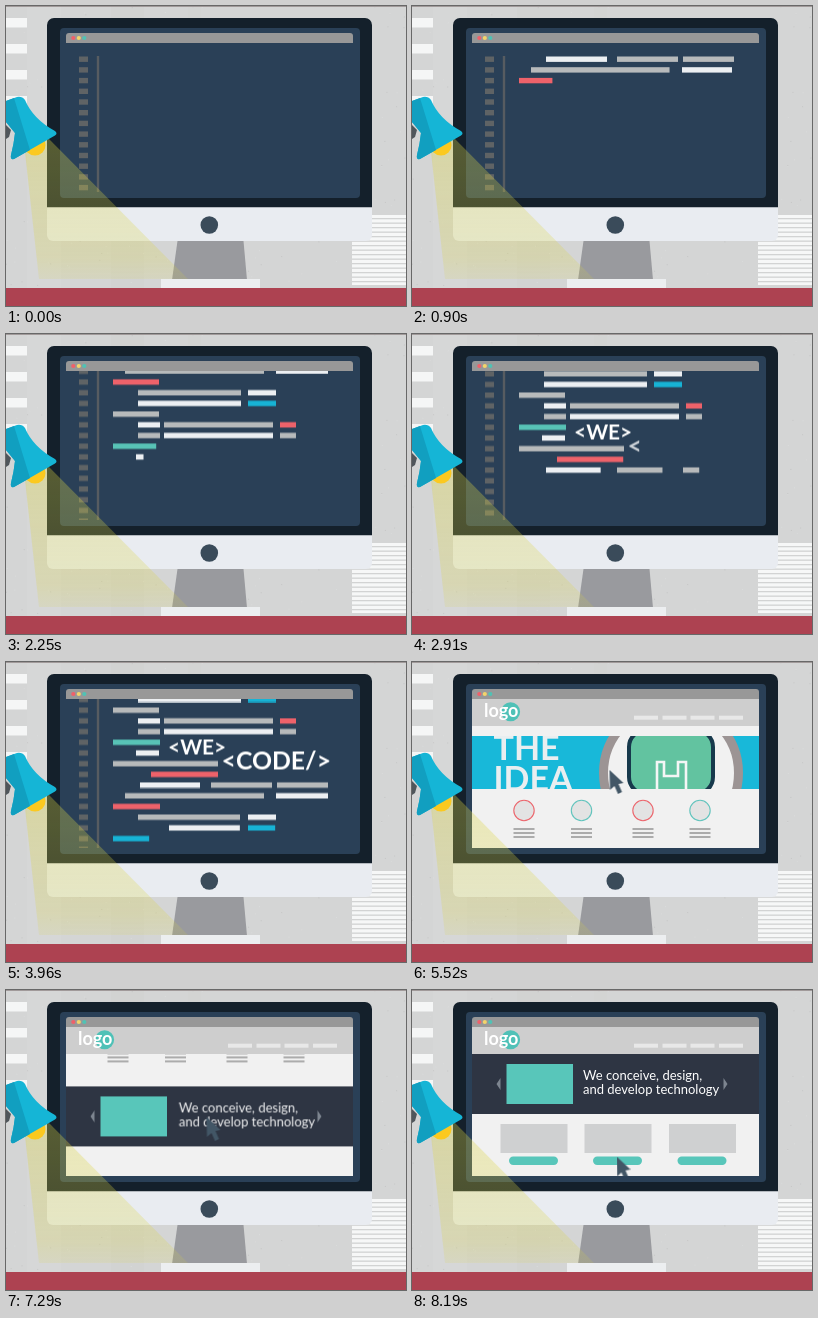
Animation, 400 px wide and 300 px high, one loop 8220 ms. Source, as an HTML page:

```html
<!DOCTYPE html>
<html lang="en">
<head>
<meta charset="utf-8">
<title>We code</title>
<style>
  html, body { margin: 0; width: 100%; height: 100%; overflow: hidden; background: #d4d5d5; }
  svg { display: block; width: 100vw; height: 100vh; }
  text { font-family: Lato, "Open Sans", sans-serif; fill: #fff; }
  .bold { font-weight: 700; }
  .grow { transform-box: fill-box; transform-origin: left center; }
  .pop { transform-box: fill-box; transform-origin: center; }
  .rise { transform-box: fill-box; transform-origin: center bottom; }
</style>
</head>
<body>
<svg viewBox="0 0 400 300" preserveAspectRatio="none">
  <defs>
    <clipPath id="view"><rect x="60" y="37" width="287" height="149"/></clipPath>
    <clipPath id="heroBox"><rect x="60" y="74" width="287" height="53"/></clipPath>
    <linearGradient id="glow" x1="0" y1="0" x2="0" y2="1">
      <stop offset="0" stop-color="#dcd545" stop-opacity=".34"/>
      <stop offset=".85" stop-color="#dcd545" stop-opacity=".24"/>
      <stop offset="1" stop-color="#dcd545" stop-opacity=".14"/>
    </linearGradient>
  </defs>

  <!-- wall -->
  <rect width="400" height="300" fill="#d4d5d5"/>
  <rect x="21" width="34" height="282" fill="#d6d7d7"/>
  <rect x="105" width="33" height="282" fill="#d2d3d2"/>
  <rect x="182" width="13" height="282" fill="#d3d4d3"/>
  <g id="specks"></g>
  <rect width="400" height="1" fill="#a19a9a"/>
  <path d="M0 12h21v9.500H0zM0 38h21v9.500H0zM0 64h21v9.500H0zM0 90h21v9.500H0z" fill="#f5f6f6"/>
  <rect x="346" y="209" width="54" height="70" fill="#f6f7f7"/>
  <g id="sheet" fill="#d2d3d3"></g>

  <!-- desk and screen -->
  <path d="M171.500 235H237.500L241 274H166Z" fill="#999a9e"/>
  <rect x="155" y="273" width="99" height="9" fill="#eceef0"/>
  <rect y="282" width="400" height="18" fill="#ad4251"/>
  <path d="M41 201H366V229a6 6 0 0 1-6 6H47a6 6 0 0 1-6-6Z" fill="#e9ecf1"/>
  <path d="M41 201.300V19a7 7 0 0 1 7-7H359a7 7 0 0 1 7 7V201.300Z" fill="#14202b"/>
  <circle cx="203.3" cy="219" r="8.8" fill="#3a4b5a"/>
  <rect x="54" y="22" width="300" height="170" rx="4" fill="#2a4057"/>
  <path d="M60 37V30a3 3 0 0 1 3-3H344a3 3 0 0 1 3 3V37Z" fill="#989898"/>
  <circle cx="67.3" cy="32" r="2.1" fill="#f0606a"/>
  <circle cx="72.8" cy="32" r="2.1" fill="#f3d46a"/>
  <circle cx="78.3" cy="32" r="2.1" fill="#50c2b4"/>

  <g clip-path="url(#view)">
    <g id="code">
      <rect x="90.8" y="50" width="2.4" height="240" fill="#575c61"/>
      <g id="gutter" fill="#5f6365"></g>
      <g id="rows"></g>
      <text id="we" class="bold" x="162" y="151" font-size="20.9"></text>
      <text id="make" class="bold" x="215.5" y="165.8" font-size="24.8"></text>
    </g>

    <g id="site">
      <rect id="paper" class="rise" x="60" y="37" width="287" height="149" fill="#f1f1f1"/>
      <g id="page">
        <g clip-path="url(#heroBox)">
          <g id="hero">
            <rect x="60" y="74" width="287" height="53" fill="#18b8d9"/>
            <g id="badge" class="pop">
              <circle cx="259" cy="111" r="67.5" fill="#f1f1f1" stroke="#9c9494" stroke-width="9"/>
              <rect x="217" y="68" width="84" height="64" rx="17" fill="#62c3a0" stroke="#17394c" stroke-width="4"/>
              <path d="M245 131V100H252V114H266V100H274V131" fill="none" stroke="#f4f6f6" stroke-width="2.6"/>
            </g>
            <g id="idea" class="bold" font-size="34">
              <text x="81.500" y="97.5" style="fill:#e9eef0">THE</text>
              <text x="81.500" y="128.5" style="fill:#e9eef0">IDEA</text>
            </g>
          </g>
        </g>
        <g id="features"></g>
        <rect x="60" y="200" width="287" height="60" fill="#2e3543"/>
        <path d="M88.500 224V236L84.500 230ZM311.500 224V236L315.500 230Z" fill="#7d8590"/>
        <rect id="slide" x="94.500" y="210" width="66.500" height="40" fill="#58c6ba"/>
        <g id="claim" font-size="13">
          <text x="171" y="226">We conceive, design,</text>
          <text x="171" y="240">and develop technology</text>
        </g>
        <g id="cards"></g>
      </g>
      <g id="head">
        <rect x="60" y="37" width="287" height="27" fill="#cecece"/>
        <g id="nav" fill="#e8e8e8"></g>
        <g id="brand">
          <circle cx="98.600" cy="49.800" r="9.500" fill="#4fc1b7"/>
          <text class="bold" x="72" y="55.300" font-size="18">logo</text>
        </g>
      </g>
      <path id="cursor" d="M0 0L14 13L9 14L12.500 22L8.500 24L5 16L.5 20Z" fill="#425666"/>
    </g>
  </g>

  <!-- lamp -->
  <path d="M19 146L42 132L182 273H33Z" fill="url(#glow)"/>
  <path d="M0 119L5 124L3 131L0 133Z" fill="#50565b"/>
  <circle cx="29" cy="139" r="10.5" fill="#fbc91f"/>
  <path id="shade" d="M0 95L11 91Q16 90 19 94Q27 113 49 125Q52 127.500 49 129.500L8 153Q4 154 5 149Q8 137 9 127L0 116Z" fill="#15b5d6"/>
  <path d="M0 95L8 92L24 144L8 153Q4 154 5 149Q8 137 9 127L0 116Z" fill="#119fc0"/>
</svg>

<script>
const LOOP = 8220, STEP = 10.7, TAIL = 250;
const SMOOTH = 'cubic-bezier(.333,0,.667,1)';
const OUT = 'cubic-bezier(.2,.7,.3,1)';
const $ = id => document.getElementById(id);

function add(parent, tag, attrs, text) {
  const el = document.createElementNS('http://www.w3.org/2000/svg', tag);
  for (const k in attrs) el.setAttribute(k, attrs[k]);
  if (text) el.textContent = text;
  parent.appendChild(el);
  return el;
}
const rect = (parent, x, y, width, height, more) =>
  add(parent, 'rect', { x, y, width, height, ...more });

// keys: [milliseconds, style]; the ends are held for the whole loop
function run(el, keys, easing = SMOOTH) {
  const all = [[0, keys[0][1]], ...keys, [LOOP, keys[keys.length - 1][1]]];
  el.animate(all.map(([ms, style]) => ({ offset: ms / LOOP, easing, ...style })),
    { duration: LOOP, iterations: Infinity });
}
const shift = (x, y) => ({ transform: `translate(${x}px,${y}px)` });
const size = (x, y = x) => ({ transform: `scale(${x},${y})` });
const fade = (el, from, to) => run(el, [[from, { opacity: 0 }], [to, { opacity: 1 }]]);

// wall grain and lined sheet
let seed = 7;
const rnd = () => (seed = seed * 16807 % 2147483647) / 2147483647;
for (let i = 0; i < 240; i++) {
  rect($('specks'), rnd() * 400, rnd() * 280, 1, 1,
    { fill: rnd() < .5 ? '#bcbdbc' : '#e0e1e1', opacity: .6 });
}
for (let y = 212; y < 278; y += 4.5) rect($('sheet'), 346, y, 54, 1.3);

// code rows: colour letter, left, right
const INK = { w: '#eceff2', g: '#b7babb', r: '#ee626a', c: '#17b3d5', t: '#58c3b6' };
const ROWS = [
  'w134-195 g205-266 g271-322', 'g119-258 w270-322', 'r107-153',
  'g132-235 w242-270', 'w132-235 c242-270', 'g107-153',
  'w132-154 g158-267 r274-290', 'g132-154 w158-267 g274-290', 't107-154',
  'w130-153', 'g107-212', 'r145-212',
  'w134-194 g205-266 g271-322', 'g119-258 w270-322', 'r107-154',
  'g132-234 w242-270', 'w163-234 c242-270', 'c107-154'
];
const PACE = [[0, 300], [5.43, 1560], [12.86, 2910], [17.68, 3960], [18, 4030]];
function timeAt(row) {
  const i = Math.max(1, PACE.findIndex(p => p[0] >= row));
  const [a, s] = PACE[i - 1], [b, e] = PACE[i];
  return s + (e - s) * (row - a) / (b - a);
}
ROWS.forEach((line, n) => {
  const bars = line.split(' ').map(s => [s[0], ...s.slice(1).split('-').map(Number)]);
  const total = bars.reduce((sum, [, l, r]) => sum + r - l, 0);
  let done = 0;
  for (const [ink, l, r] of bars) {
    const bar = rect($('rows'), l, 50.5 + n * STEP, r - l, 5.4, { fill: INK[ink], class: 'grow' });
    const start = timeAt(n + done / total);
    done += r - l;
    const end = timeAt(Math.min(18, n + done / total)) + TAIL;
    run(bar, [[start, size(0, 1)], [end, size(1)]], OUT);
  }
});
for (let n = 0; n < 20; n++) rect($('gutter'), 73, 50.5 + n * STEP, 9, 5.4);
run($('code'), [[880, shift(0, 0)], [3800, shift(0, -58.5)]]);

function type(el, word, start) {
  [...word].forEach((ch, i) => {
    const at = start + i * 90;
    run(add(el, 'tspan', {}, ch), [[at, { fillOpacity: 0 }], [at + 90, { fillOpacity: 1 }]]);
  });
}
type($('we'), '<WE>', 2300);
type($('make'), '<CODE/>', 2850);

// web page parts
[222, 250.5, 278.5, 307].forEach((x, i) => {
  fade(rect($('nav'), x, 53.7, 24, 4), 4950 + i * 60, 5100 + i * 60);
});
[112, 169.5, 231, 288].forEach((x, i) => {
  const at = 5080 + i * 60;
  const ring = add($('features'), 'circle', {
    cx: x, cy: 148.5, r: 10.2, fill: '#e3e3e3', class: 'pop',
    stroke: i % 2 ? '#62c4bd' : '#ec666d', 'stroke-width': 1.1
  });
  run(ring, [[at, size(0)], [at + 220, size(1)]], OUT);
  for (let k = 0; k < 3; k++) {
    const line = rect($('features'), x - 10.5, 166 + k * 4, 21, 2, { fill: '#acacac', class: 'grow' });
    run(line, [[at + 60 + k * 40, size(0, 1)], [at + 180 + k * 40, size(1)]]);
  }
});
[88.5, 172.5, 257].forEach((x, i) => {
  const at = 7300 + i * 90;
  const card = rect($('cards'), x, 270, 67, 29, { fill: '#cfd0d1', class: 'pop' });
  const button = rect($('cards'), x + 8.5, 302.5, 49, 8.5, { rx: 4.2, fill: '#58c6ba', class: 'pop' });
  run(card, [[at, size(0)], [at + 250, size(1)]], OUT);
  run(button, [[at + 180, size(0, 1)], [at + 400, size(1)]], OUT);
});

run($('paper'), [[4250, size(1, 0)], [4600, size(1)]], OUT);
run($('head'), [[4450, shift(0, -40)], [4750, shift(0, 0)]], OUT);
fade($('brand'), 4950, 5200);
run($('hero'), [[4800, shift(-290, 0)], [5150, shift(0, 0)]], OUT);
run($('badge'), [[5000, size(0)], [5400, size(1)]], OUT);
run($('idea'), [[5050, shift(0, 60)], [5450, shift(0, 0)]], OUT);
run($('page'), [
  [5950, shift(0, 0)], [6500, shift(0, -66)],
  [6950, shift(0, -66)], [7600, shift(0, -136)]
]);
for (const [id, at] of [['slide', 6850], ['claim', 7050]]) {
  run($(id), [
    [at, { opacity: 0, ...shift(30, 0) }], [at + 420, { opacity: 1, ...shift(0, 0) }]
  ], OUT);
}
run($('cursor'), [
  [5100, { opacity: 0, ...shift(225, 140) }], [5200, { opacity: 1, ...shift(222, 136) }],
  [5500, { opacity: 1, ...shift(197.5, 108) }], [5950, { opacity: 1, ...shift(197.5, 108) }],
  [6500, { opacity: 1, ...shift(200.5, 127) }], [7500, { opacity: 1, ...shift(200.5, 127) }],
  [8050, { opacity: 1, ...shift(204.5, 166.5) }]
]);
</script>
</body>
</html>
```
